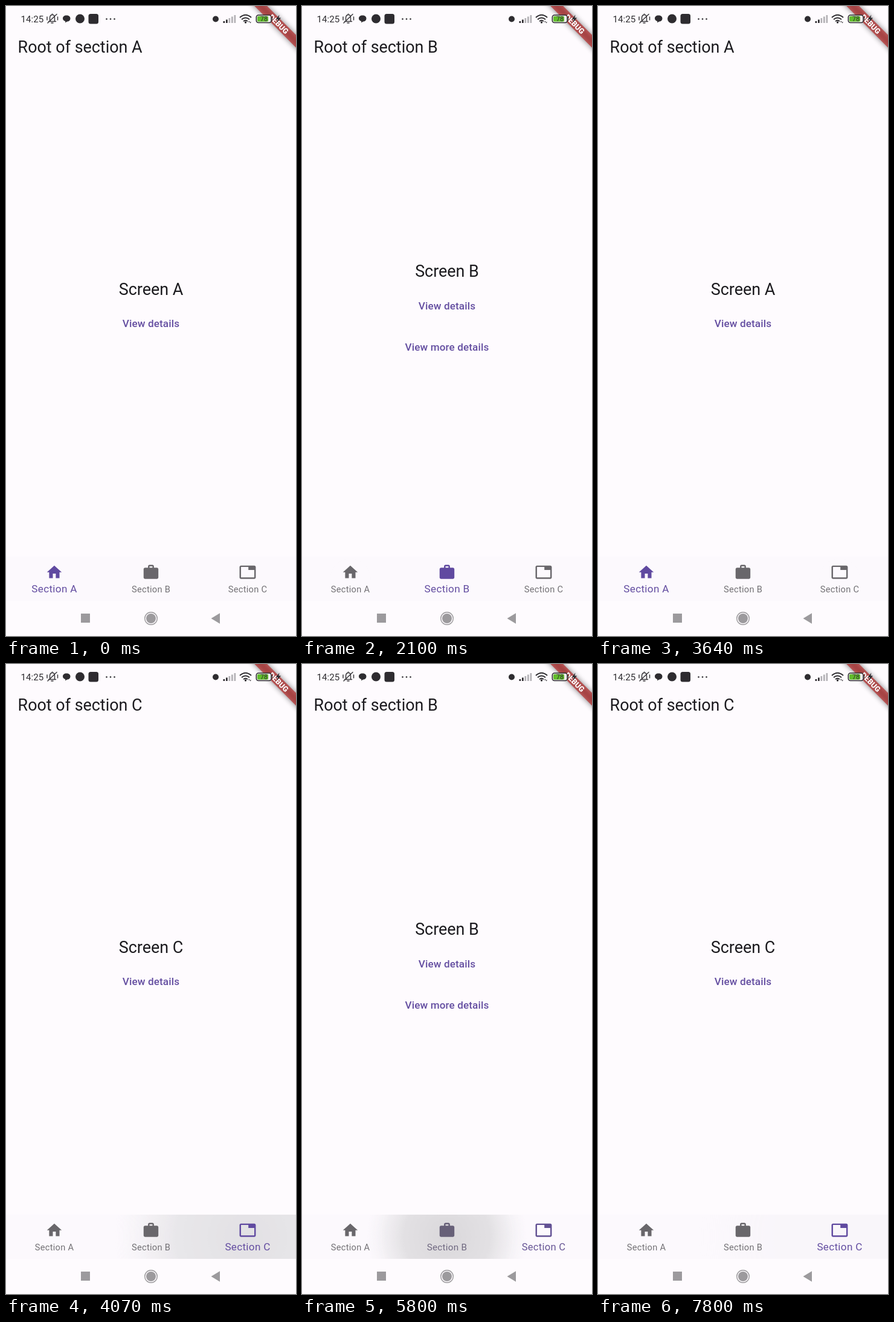
These frames come from a looping animation (480 px wide and 1040 px high, 8000 ms). An HTML page:

```html
<!DOCTYPE html>
<html lang="en">
<head>
<meta charset="utf-8">
<title>Section navigation</title>
<style>
  @property --on { syntax: "<number>"; inherits: true; initial-value: 0; }

  html, body { margin: 0; width: 100%; height: 100%; overflow: hidden; background: #fefbfe; }
  svg { display: block; width: 100vw; height: 100vh; font-family: Roboto, sans-serif; }
  text { text-anchor: middle; }

  .title { font-size: 26.9px; fill: #1c1b1f; }
  .start { text-anchor: start; }
  .link { font-size: 17.1px; font-weight: 500; letter-spacing: .12px; fill: #644ea1; }

  .screen, .tab { animation: 8s infinite; }
  .screen { opacity: 0; animation-timing-function: step-end; }
  .tab {
    animation-timing-function: cubic-bezier(.4, 0, .2, 1);
    fill: color-mix(in srgb, #604aa0 calc(var(--on) * 100%), #69676b);
  }
  .tab text {
    font-size: 17.1px;
    letter-spacing: .31px;
    fill: color-mix(in srgb, #644ea1 calc(var(--on) * 100%), #737175);
    transform: translateY(calc(var(--on) * -.7px)) scale(calc(.857 + .143 * var(--on)));
  }
  .ripple { opacity: 0; }

  #screenA { animation-name: showA; }
  #screenB { animation-name: showB; }
  #screenC { animation-name: showC; }
  #tabA { animation-name: pickA; }
  #tabB { animation-name: pickB; }
  #tabC { animation-name: pickC; }

  @keyframes showA { 0%, 29.625% { opacity: 1 } 9%, 48%, 100% { opacity: 0 } }
  @keyframes showB { 0%, 29.625%, 92%, 100% { opacity: 0 } 9%, 71.875% { opacity: 1 } }
  @keyframes showC { 0%, 71.875% { opacity: 0 } 48%, 92%, 100% { opacity: 1 } }

  @keyframes pickA {
    0%, 9%, 32.125%, 48% { --on: 1 }
    11.5%, 29.625%, 50.5%, 100% { --on: 0 }
  }
  @keyframes pickB {
    0%, 9%, 32.125%, 71.875%, 94.5%, 100% { --on: 0 }
    11.5%, 29.625%, 74.375%, 92% { --on: 1 }
  }
  @keyframes pickC {
    0%, 48%, 74.375%, 92% { --on: 0 }
    50.5%, 71.875%, 94.5%, 100% { --on: 1 }
  }
</style>
</head>
<body>
<svg viewBox="0 0 480 1040">
  <defs>
    <radialGradient id="ink">
      <stop offset="0" stop-color="#dad8db"/>
      <stop offset=".55" stop-color="#e3e1e4"/>
      <stop offset=".75" stop-color="#ebe9ec" stop-opacity=".75"/>
      <stop offset="1" stop-color="#f4f2f6" stop-opacity="0"/>
    </radialGradient>
    <clipPath id="bar"><rect y="909" width="480" height="73"/></clipPath>
    <filter id="soft" x="-20%" y="-150%" width="140%" height="400%">
      <feGaussianBlur stdDeviation="4.8"/>
    </filter>
  </defs>

  <rect width="480" height="1040" fill="#fefbfe"/>

  <g class="screen" id="screenA">
    <text class="title start" x="19.6" y="77">Root of section A</text>
    <text class="title" x="240" y="477">Screen A</text>
    <text class="link" x="240" y="530">View details</text>
  </g>
  <g class="screen" id="screenB">
    <text class="title start" x="19.6" y="77">Root of section B</text>
    <text class="title" x="240" y="447">Screen B</text>
    <text class="link" x="240" y="501">View details</text>
    <text class="link" x="240" y="569">View more details</text>
  </g>
  <g class="screen" id="screenC">
    <text class="title start" x="19.6" y="77">Root of section C</text>
    <text class="title" x="240" y="477">Screen C</text>
    <text class="link" x="240" y="530">View details</text>
  </g>

  <!-- tab bar -->
  <rect y="909" width="480" height="73" fill="#fcf9fd"/>
  <g id="ripples" clip-path="url(#bar)"></g>
  <g class="tab" id="tabA">
    <path transform="translate(65.3 920) scale(1.222)" d="M10 20v-6h4v6h5v-8h3L12 3 2 12h3v8z"/>
    <g transform="translate(80 968.2)"><text>Section A</text></g>
  </g>
  <g class="tab" id="tabB">
    <path transform="translate(225.3 920) scale(1.222)" d="M20 6h-4V4c0-1.1-.9-2-2-2h-4c-1.1 0-2 .9-2 2v2H4c-1.1 0-2 .9-2 2v11c0 1.1.9 2 2 2h16c1.1 0 2-.9 2-2V8c0-1.1-.9-2-2-2zm-6 0h-4V4h4z"/>
    <g transform="translate(240 968.2)"><text>Section B</text></g>
  </g>
  <g class="tab" id="tabC">
    <path transform="translate(385.3 920) scale(1.222)" d="M21 3H3c-1.1 0-2 .9-2 2v14c0 1.1.9 2 2 2h18c1.1 0 2-.9 2-2V5c0-1.1-.9-2-2-2zm0 16H3V5h10v4h8z"/>
    <g transform="translate(400 968.2)"><text>Section C</text></g>
  </g>

  <!-- system buttons -->
  <g fill="#9c9a9d">
    <rect x="124" y="1003" width="15" height="15"/>
    <circle cx="240" cy="1011" r="8"/>
    <circle cx="240" cy="1011" r="10.3" fill="none" stroke="#9c9a9d" stroke-width="1.4"/>
    <path d="M339.5 1011l14.5-8.7v17.4z"/>
  </g>

  <!-- corner banner -->
  <g transform="translate(451.5 29.8) rotate(45)">
    <rect x="-60" y="-7.4" width="120" height="14.8" opacity=".5" filter="url(#soft)"/>
    <rect x="-60" y="-7.4" width="120" height="14.8" fill="#b71c1c" opacity=".63"/>
    <text y="4.4" font-size="12.4" font-weight="900" fill="#fff">DEBUG</text>
  </g>

  <!-- status bar -->
  <g fill="#2e2c30">
    <text class="start" x="24.5" y="27" font-size="15.2">14:25</text>
    <g fill="none" stroke="#3a383c" stroke-width="1.5" stroke-linecap="round">
      <path d="M70.5 25.5h12M72.5 25v-5q0-5 4-5.5t4 5.5v5M75 28h3M76.5 14v-1M69 28L84 13.5M68 18v5M85.5 18v5"/>
    </g>
    <path d="M100 15.5c4 0 6.5 2 6.5 5s-2.3 5-5 5l-3.5 2 .3-2.3c-2.5-.7-4.3-2.3-4.3-4.7 0-3 2.5-5 6-5z"/>
    <circle cx="122.5" cy="21" r="7.5"/>
    <rect x="136.5" y="13" width="16.5" height="16.5" rx="3.5"/>
    <circle cx="166.5" cy="21.5" r="1.3"/>
    <circle cx="173" cy="21.5" r="1.3"/>
    <circle cx="179.5" cy="21.5" r="1.3"/>

    <circle cx="347" cy="21.5" r="5"/>
    <rect x="359.5" y="25" width="2.7" height="3"/>
    <rect x="364" y="22.5" width="2.7" height="5.5"/>
    <g fill="#b3b1b5">
      <rect x="368.5" y="20" width="2.7" height="8"/>
      <rect x="373" y="17.5" width="2.7" height="10.5"/>
      <rect x="377.5" y="15" width="2.7" height="13"/>
    </g>

    <g fill="none" stroke="#2e2c30" stroke-width="1.9">
      <path d="M387 19q9.5-8.5 19 0M390 22.3q6.5-5.5 13 0M393 25.3q3.5-3 7 0"/>
    </g>
    <circle cx="396.5" cy="27" r="1.7"/>
    <path d="M401 26.5l1.3-2 1.3 2zM403.3 26.5h2.6l-1.3 2z"/>

    <rect x="414.3" y="15" width="24.8" height="12.5" rx="3.5" fill="#efecef" stroke="#2e2c30" stroke-width="1.6"/>
    <rect x="416" y="16.7" width="18" height="9.1" rx="1.8" fill="#62bd2c"/>
    <path d="M440.5 19h1v4.5h-1z"/>
    <text x="427" y="25" font-size="10.5">78</text>
    <path d="M452.5 14.5l-6 7.5h3.5l-1.5 5.5 6.5-8h-3.7z"/>
  </g>
</svg>
<script>
  const LOOP = 8000, RADIUS = 235;
  // tap centre, press time, end of fade, time the last tint goes
  const taps = [
    [240, 500, 1200, 2100],
    [80, 2100, 2870, 3400],
    [400, 3640, 4300, 4750],
    [240, 5500, 6240, 7170],
    [400, 7170, 7800, LOOP]
  ];
  // progress, radius, opacity
  const poses = [
    [0, 40, 0], [.2, 85, .7], [.4, 130, 1],
    [.65, 220, .75], [.78, 230, .5], [1, RADIUS, .1]
  ];
  const layer = document.getElementById("ripples");

  for (const [x, start, end, gone] of taps) {
    const spot = document.createElementNS("http://www.w3.org/2000/svg", "g");
    spot.setAttribute("transform", `translate(${x} 945.5)`);
    spot.innerHTML = `<circle class="ripple" r="${RADIUS}" fill="url(#ink)"/>`;
    layer.append(spot);

    const key = (time, radius, opacity) =>
      ({ offset: time / LOOP, transform: `scale(${radius / RADIUS})`, opacity });
    const frames = [
      key(0, 40, 0),
      ...poses.map(([p, r, o]) => key(start + p * (end - start), r, o)),
      key(gone, RADIUS, .1)
    ];
    if (gone < LOOP) frames.push(key(gone, RADIUS, 0), key(LOOP, RADIUS, 0));
    spot.firstChild.animate(frames, { duration: LOOP, iterations: Infinity });
  }
</script>
</body>
</html>
```
